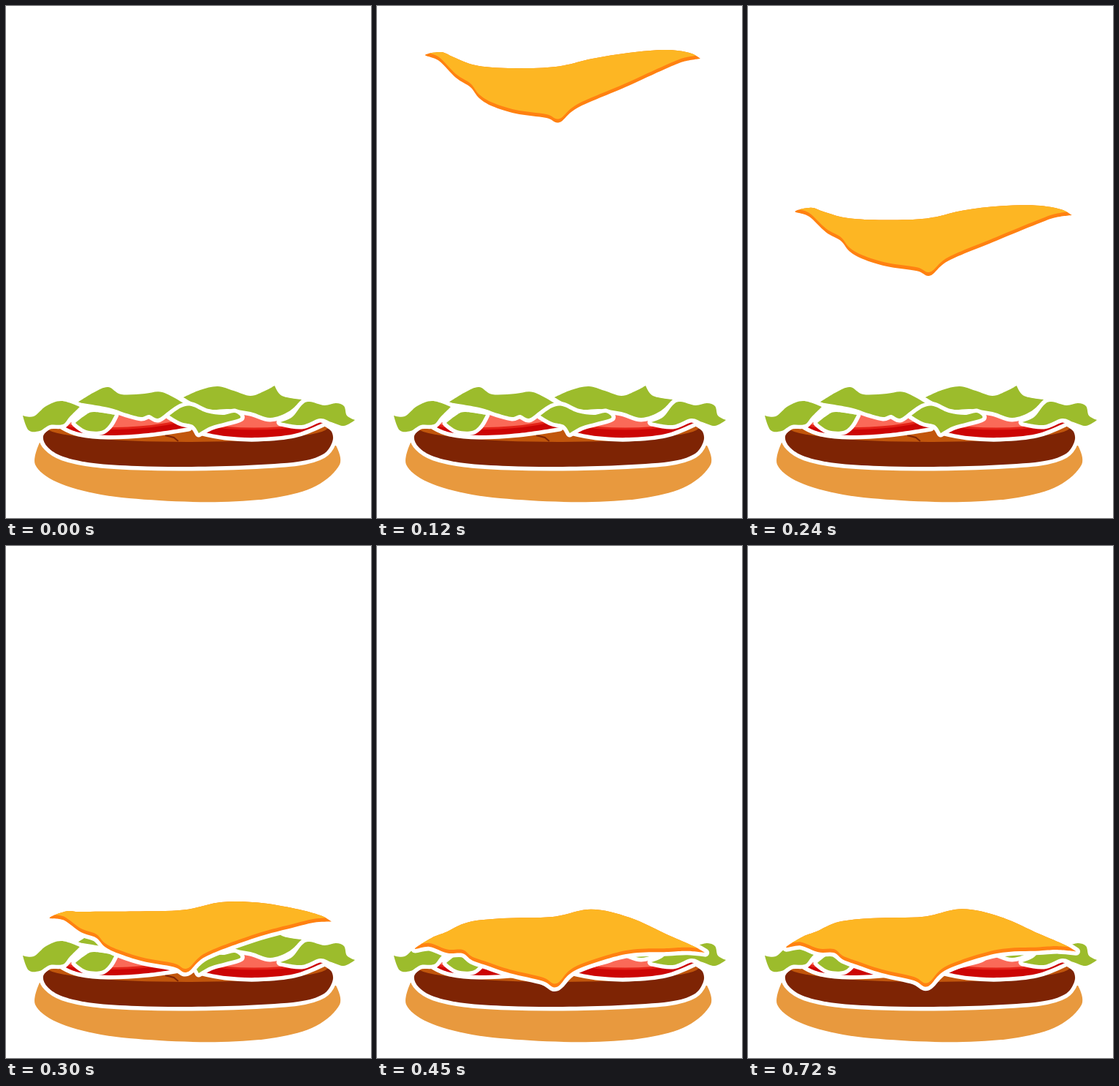
Recreate the animation shown at these times as an HTML page. Size 500 px wide and 700 px high, loop 0.75 s.

```html
<!DOCTYPE html>
<html lang="en">
<head>
<meta charset="utf-8">
<title>Burger</title>
<style>
  html, body { margin: 0; width: 100%; height: 100%; overflow: hidden; background: #fff; }
  svg { display: block; width: 500px; height: 700px; }
  .rimmed { stroke: #fff; stroke-width: 11; stroke-linejoin: round; paint-order: stroke; }
</style>
</head>
<body>
<svg id="stage" viewBox="0 0 500 700"></svg>
<script>
const LOOP = 750, TICK = 30;
const SHOWN = 4, LAND = 10, REST = 18, LAST = 24;
const MID = 250;

const clamp = x => Math.min(1, Math.max(0, x));
const smoothstep = (a, b, x) => { const t = clamp((x - a) / (b - a)); return t * t * (3 - 2 * t); };

// "x,y" key points; a trailing "!" makes a sharp corner.
const points = text => text.split(' ').map(s => {
  const [x, y] = s.split(',').map(parseFloat);
  return { x, y, sharp: s.endsWith('!') };
});

// Smooth closed curve through the key points.
function spline(pts) {
  const at = i => pts[(i + pts.length) % pts.length];
  const handle = (i, sign) => {
    const p = at(i), k = p.sharp ? 0 : sign / 6;
    return [p.x + k * (at(i + 1).x - at(i - 1).x), p.y + k * (at(i + 1).y - at(i - 1).y)];
  };
  const curve = pts.map((p, i) => 'C' + [...handle(i, 1), ...handle(i + 1, -1), at(i + 1).x, at(i + 1).y].map(v => v.toFixed(2)));
  return `M${pts[0].x},${pts[0].y}${curve.join('')}Z`;
}

const rimmed = (d, fill) => `<path class="rimmed" fill="${fill}" d="${d}"/>`;

// A rimmed shape with extra drawing clipped to it.
const layered = (id, d, fill, inside) => `
  <clipPath id="${id}"><path d="${d}"/></clipPath>
  ${rimmed(d, fill)}<g clip-path="url(#${id})">${inside}</g>`;

const bun = spline(points('46,597! 40,627 70,651 130,668 210,676 295,678 370,672 425,656 457,627 452,601!'));
const patty = spline(points('51,588 57,603 78,616 120,625 180,629 250,630 330,628 400,623 434,613 447,596 446,582 436,575! 62,576!'));
const tomatoL = spline(points('78,574! 100,583 140,587 195,584 250,576! 230,553 150,550'));
const tomatoR = spline(points('264,581! 300,588 345,590 395,585 434,570! 330,541 246,541'));

const face = (cx, cy, rx, ry, tilt) => `<ellipse cx="${cx}" cy="${cy}" rx="${rx}" ry="${ry}"
  fill="#fa6a58" stroke="#e42318" stroke-width="3" transform="rotate(${tilt} ${cx} ${cy})"/>`;

const leaves = [
  '243,535! 266,525 290,520 312,526 335,533 355,526 368,519! 378,533 405,538! 388,554 362,563 335,555 305,551 275,551',
  '98,542! 121,528 140,521 158,531 190,530 214,528 243,543! 222,555 208,564 196,559 185,562 165,557 140,549',
  '224,560! 240,549 254,547 275,556 297,559 313,556 321,563 301,569 280,575 264,584! 256,573 240,569',
  '95,570! 108,560 120,555 149,559! 141,573 130,581 110,580',
  '23,560! 38,561 55,547 76,540 101,548! 87,562 78,572 60,573 46,581 31,580',
  '376,569! 392,562 406,545 416,541 436,546 452,543 463,547 467,560 478,566! 463,574 446,569 430,564 405,573'
];

const top_ = points('66,67 88,63 105,70 135,81 180,85 245,83 295,72 345,64 395,60 428,64 443,72!');
const under = points('420,76 395,86 340,111 275,139 250,159 232,153 190,147 158,137 140,126 128,111 108,98 85,75');

// The slice lowered by drop; bend 0 hangs from its wings, 1 lies over the stack.
function slice(drop, bend) {
  const place = sag => p => {
    const d = Math.abs(p.x - MID);
    const wing = smoothstep(p.x < MID ? 90 : 35, 190, d);
    return {
      x: MID + (p.x - MID) * (1 + 0.055 * bend) - 4 * bend,
      y: p.y + drop + bend * sag(d, wing),
      sharp: p.sharp
    };
  };
  return spline([
    ...top_.map(place((d, wing) => 60 * wing - 20)),
    ...under.map(place((d, wing) => 38 * wing - 8 * Math.sin(Math.PI * clamp(d / 190))))
  ]);
}

function pose(step) {
  if (step <= LAND) {
    const n = Math.max(0, step - SHOWN);
    const drop = 16 * n + 9.1 * n * n;
    return slice(drop, 0.45 * (drop / 424) ** 2);
  }
  const m = step - LAND;
  const spring = 1 - Math.exp(-0.8 * m) * Math.cos(0.9 * m);
  const k = spring - 0.04 * clamp((step - REST) / (LAST - REST));
  return slice(424 + 20 * k, 0.45 + 0.55 * k);
}

const stage = document.getElementById('stage');
stage.innerHTML = `
  <path fill="#e8993e" d="${bun}"/>
  ${layered('inPatty', patty, '#7e2404', `
    <ellipse cx="248" cy="576" rx="193" ry="20" fill="#c1560c"/>
    <path d="M218,587 l12,3 l6,5" fill="none" stroke="#7e2404" stroke-width="2"/>`)}
  ${layered('inL', tomatoL, '#cc0505', face(166, 562, 92, 15, -3))}
  ${layered('inR', tomatoR, '#cc0505', face(340, 560, 92, 18, 0))}
  ${leaves.map(leaf => rimmed(spline(points(leaf)), '#9cbc2c')).join('')}
  <g id="cheese">${layered('inSlice', '', '#ff8111', '<path id="glaze" fill="#fdb623" transform="translate(0 -5)"/>')}</g>`;

const cheese = document.getElementById('cheese');
const outlines = cheese.querySelectorAll('path');

function draw(time) {
  const step = Math.floor((time % LOOP) / TICK);
  const d = pose(step);
  outlines.forEach(path => path.setAttribute('d', d));
  cheese.setAttribute('opacity', clamp(step / SHOWN));
}

const start = performance.now();
function loop() {
  draw(performance.now() - start);
  requestAnimationFrame(loop);
}
loop();
</script>
</body>
</html>
```
